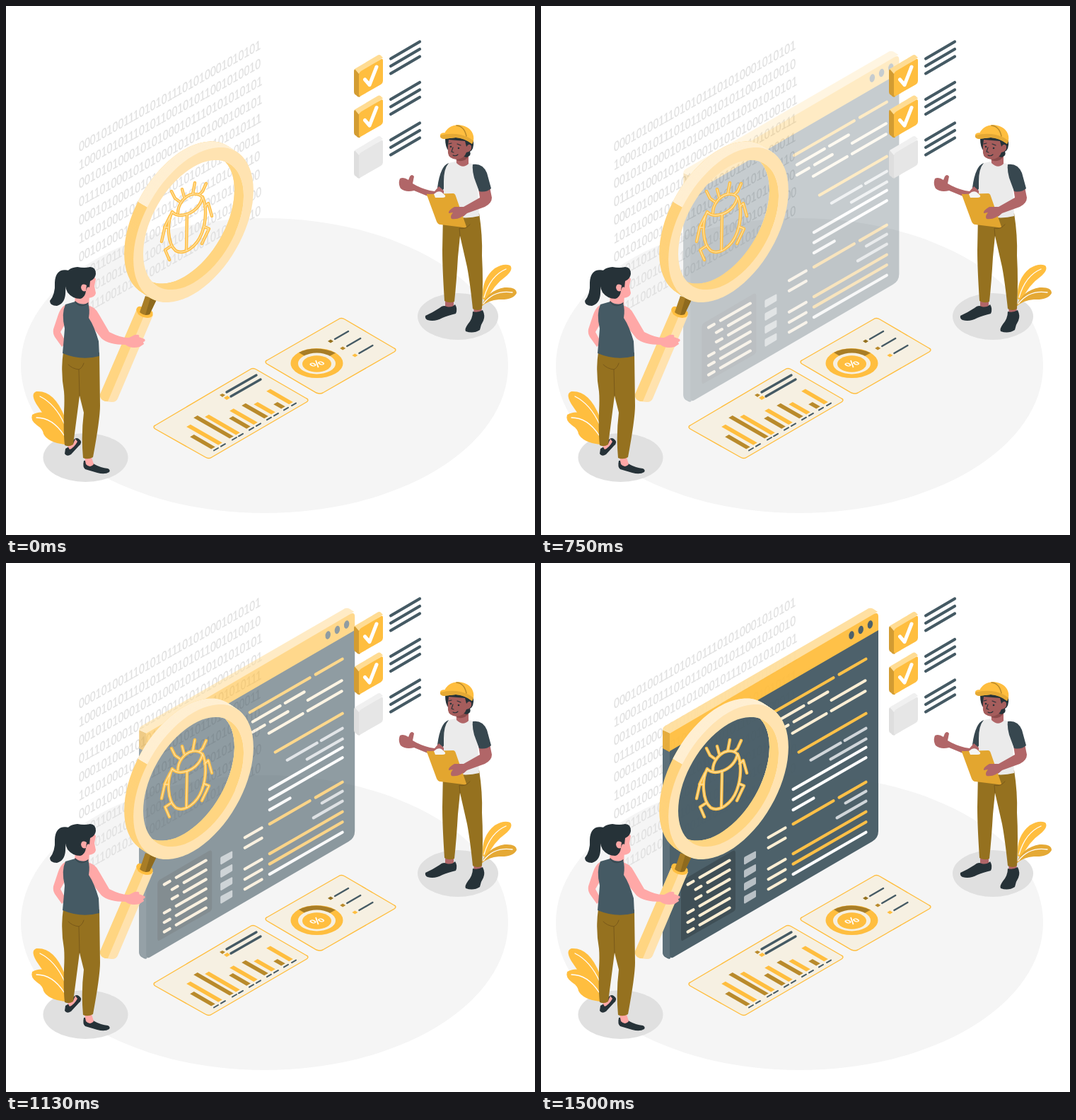
An HTML page for the animation above (1540 ms loop, 748 px wide and 748 px high).

```html
<!DOCTYPE html>
<html lang="en">
<head>
<meta charset="utf-8">
<title>Bug inspection</title>
<style>
html, body { margin: 0; width: 100%; height: 100%; overflow: hidden; background: #fff; }
svg { display: block; width: 100vw; height: 100vh; }
.y { fill: #ffbe3f } .d { fill: #263238 } .s { fill: #455a64 } .b { fill: #95711f }
.skin { fill: #ffa8a7 } .brown { fill: #b16668 }
.line { fill: none; stroke-linecap: round; stroke-linejoin: round }
#code text { font: 19px "Liberation Sans", Arial, sans-serif; fill: #e0e0e0; stroke: #e0e0e0; stroke-width: .3 }
</style>
</head>
<body>
<svg viewBox="0 0 748 748" xmlns="http://www.w3.org/2000/svg">
<defs>
  <clipPath id="hole"><circle r="82" transform="matrix(.866 -.5 0 1 265 309.5)"/></clipPath>
  <clipPath id="upper"><path d="M150 150H360V330L203 286L150 256Z"/></clipPath>
</defs>

<ellipse cx="365.5" cy="508.5" rx="344.5" ry="208.5" fill="#f5f5f5"/>
<ellipse cx="112.5" cy="638.5" rx="60" ry="34.5" fill="#e0e0e0"/>
<ellipse cx="639" cy="439" rx="57" ry="33" fill="#e0e0e0"/>
<g id="code"></g>

<g id="panel">
  <path class="s" d="M171 262L182 265V559Q180 561 176 558Q171 556 171 550Z"/>
  <path d="M171 262L182 268V559Q171 557 171 550Z" fill="#566a74"/>
  <path d="M171 236L182 241V268L171 262Z" fill="#e5a935"/>
  <path d="M171 236Q171 232 175 230L459 66Q464 62 469 65L475 69L182 241Z" fill="#ffdf9e"/>
  <path class="y" d="M181 241L468 73Q476 68 476 76V97L181 268Z"/>
  <path class="s" d="M181 266L476 95V379Q476 389 467 394L187 557Q181 561 181 553Z"/>
  <g id="dots" class="s"></g>
  <path d="M197 454Q197 450 200 448L270 407Q274 405 274 410V488Q274 491 271 493L201 533Q197 536 197 531Z" fill="#37474f"/>
  <g id="lines" class="line" stroke-width="4.1"></g>
  <g id="tiles" fill="#b5bec3"></g>
</g>

<g id="lens">
  <path d="M184 431L133 549Q132 556 140 559L150 560Q156 560 158 555L208 437Z" fill="#ffe2ae"/>
  <path d="M184 431L133 549Q132 556 140 559L144 559L196 436Z" fill="#ffd581"/>
  <path class="y" d="M184 430Q185 424 191 425L207 432Q209 437 205 440Q196 443 187 436Z"/>
  <path d="M197 410L213 415L203 436Q196 439 189 433Z" fill="#a87d26"/>
  <path d="M204 413L213 415L203 436L197 437Z" fill="#8e6a1e"/>
  <g id="rim" fill-rule="evenodd"></g>
</g>
<g id="bug"></g>

<!-- leaves -->
<path class="y" d="M83 604Q58 588 43 563Q34 548 43 545Q68 543 83 581Z"/>
<path class="y" d="M83 620Q59 617 53 605Q52 598 44 593Q34 586 37 578Q50 570 69 580Q80 588 84 600Z"/>
<path class="line" d="M48 552Q70 563 83 592M43 582Q66 582 82 607" stroke="#fff" stroke-width="1.3"/>

<!-- woman -->
<path class="skin" d="M87 422Q78 423 73 439L67 457Q66 463 69 468L79 482L85 476L77 461L86 445Z"/>
<path class="d" d="M84 626Q91 623 96 613Q100 609 104 613Q109 617 103 622L92 634Q86 638 83 633ZM110 643Q117 641 125 648Q134 653 144 654Q148 656 146 659Q140 663 129 660L112 655Q108 652 110 643Z"/>
<path class="skin" d="M85 619L95 619L98 612L101 616Q96 625 90 627ZM111 638L121 638L124 648Q119 654 113 648Z"/>
<path class="b" d="M81 489Q77 517 82 545Q83 556 82 574Q81 604 83 621Q89 624 95 620L104 551L110 575Q106 607 109 639Q116 642 123 638Q133 584 133 565L132 490Z"/>
<path class="line" d="M104 551L103 514Q94 513 88 507M103 514Q108 512 110 505" stroke="#79591a" stroke-width="1"/>
<path class="skin" d="M113 423Q126 424 132 437L146 461Q164 470 174 469L182 465Q190 464 188 468L196 471Q198 474 194 475L195 478L189 482Q176 485 169 479Q145 479 135 470L119 450Z"/>
<path class="skin" d="M98 402L118 408L117 425Q109 432 97 424Z"/>
<path class="s" d="M84 422Q91 420 98 418Q108 424 116 420Q119 429 117 441Q125 453 131 474L132 495Q106 502 80 491Q82 469 83 456Q78 435 84 422Z"/>
<path class="line" d="M98 418Q105 428 116 420" stroke="#37474f" stroke-width="1.5"/>
<path class="skin" d="M107 383Q122 377 127 386L125 396L127 406Q126 412 116 413L107 407Z"/>
<path class="d" d="M89 374Q70 370 69 391Q70 407 62 417Q62 424 72 424Q83 421 84 407Q84 388 89 381Z"/>
<path class="d" d="M84 382Q86 370 101 369Q111 371 119 369Q127 369 127 379Q126 386 119 389L118 398Q115 395 113 403Q112 412 105 414Q94 414 87 405Q82 396 84 382Z"/>
<path class="skin" d="M114 395Q107 391 106 398Q107 405 113 403Z"/>

<!-- cards -->
<g fill="#f6f0e2" stroke="#ffbe3f" stroke-width="1.4">
  <path d="M211 593L345 514Q349 511 354 514L425 555Q429 557 425 560L291 638Q287 641 282 638L211 598Q207 595 211 593Z"/>
  <path d="M369 501L470 443Q474 440 479 443L549 484Q553 486 549 489L448 547Q444 549 439 547L369 506Q365 503 369 501Z"/>
</g>
<g id="chart"></g>
<path class="line" d="M312 546L354 522M318 552L360 528" stroke="#455a64" stroke-width="3.4"/>
<path d="M302 550L306 548L310 550L306 553Z" fill="#b98a2b"/><path class="y" d="M308 554L313 551L317 554L312 557Z"/>
<ellipse class="y" cx="439.5" cy="505" rx="37" ry="21"/>
<path d="M439.5 505L414 490Q438 479 466 490.5Z" fill="#a87d26"/>
<ellipse cx="439.5" cy="505.5" rx="26.5" ry="15" fill="#f6f0e2"/>
<ellipse class="y" cx="439.5" cy="506" rx="20.5" ry="11.7"/>
<text transform="matrix(.7 -.4 .7 .4 445 509)" text-anchor="middle" font-family="Liberation Sans, sans-serif" font-weight="bold" font-size="22" fill="#fff">%</text>
<g id="legend"></g>

<g id="checks"></g>

<!-- right plant -->
<path class="y" d="M674 414Q672 386 691 371Q704 363 713 367Q718 373 706 383Q690 394 679 417Z"/>
<path d="M672 425Q681 402 705 398Q722 397 722 406Q717 416 697 415Q682 416 672 425Z" fill="#e5a935"/>
<path class="line" d="M707 372Q685 381 676 412M716 405Q690 401 675 421" stroke="#fff" stroke-width="1.3"/>

<!-- man -->
<path class="brown" d="M621 415L633 415L633 426L621 430ZM661 425L673 425L672 436L662 438Z"/>
<path class="d" d="M593 438Q604 433 613 427Q618 422 623 425Q630 427 635 422Q639 428 636 435Q624 438 617 441Q606 447 596 444Q592 442 593 438ZM660 432Q667 434 674 430Q678 438 675 445Q671 451 670 458Q661 464 650 460Q648 457 653 450Q660 442 660 432Z"/>
<path class="b" d="M618 294L669 293Q674 325 673 353Q675 390 673 428Q667 432 660 428Q656 390 652 369L642 325L639 355Q637 390 634 418Q627 421 620 417Q617 371 617 345Z"/>
<path class="line" d="M642 325L641 314Q649 317 656 309" stroke="#79591a" stroke-width="1"/>
<path d="M626 222Q614 226 610 257L617 262L625 247Z" fill="#37474f"/>
<path class="brown" d="M612 255L620 262L619 273Q604 272 594 268L577 261Q565 264 558 258Q554 251 557 244Q562 241 569 246L571 241Q574 237 577 241L575 251Q590 260 606 262Z"/>
<path d="M626 222Q643 217 661 224Q668 235 667 255L669 297Q646 303 619 294L619 248Q619 230 626 222Z" fill="#ebebeb"/>
<path class="brown" d="M636 207L654 207L654 223Q646 231 637 222Z"/>
<path d="M637 214Q647 216 654 207V213Q647 222 637 218Z" fill="#8c4b4b"/>
<path class="brown" d="M668 258L684 256L687 271Q687 279 677 284L652 293Q641 304 630 301Q624 294 629 287L647 284L670 271Z"/>
<path d="M660 224Q674 222 680 236L686 258Q679 264 669 262L662 243Q659 232 660 224Z" fill="#37474f"/>
<path d="M595 267Q594 265 598 266L632 265Q635 265 636 269L651 312Q651 314 646 313L614 309Q611 309 609 305Z" fill="#e3a62f"/>
<path d="M605 266L609 263Q614 261 617 264L621 268Q622 271 617 271L607 271Z" fill="#f5f5f5"/>
<path class="brown" d="M650 284L634 284Q625 289 626 293L632 292Q627 298 630 301Q642 303 653 291Z"/>
<path class="d" d="M621 187Q621 200 626 205L651 214Q659 211 656 206Q662 203 661 190L650 181Z"/>
<path d="M626 189L649 191L651 199Q655 193 658 198Q659 206 651 207Q648 216 637 217Q626 216 625 208Q624 199 626 189Z" fill="#a55d5c"/>
<path class="line" d="M626 195L630 194M638 195L643 197M632 200L630 206L633 207M632 211Q636 213 639 210" stroke="#263238" stroke-width="1.1"/>
<circle class="d" cx="629" cy="199" r="1.3"/><circle class="d" cx="640" cy="201" r="1.3"/>
<path class="y" d="M619 183Q623 169 640 168Q658 170 661 184Q662 190 659 195Q648 186 636 186L619 188Q613 187 614 182Q615 179 621 179Z"/>
<path d="M614 183Q629 179 643 182Q655 185 661 191L659 195Q648 187 636 186L619 188Q613 187 614 183Z" fill="#e5a935"/>
<path class="line" d="M637 169Q648 170 651 184" stroke="#b98a2b" stroke-width="1.5"/>
</svg>

<script>
const $ = id => document.getElementById(id);
const put = (id, html) => $(id).insertAdjacentHTML('beforeend', html);
const SLOPE = 0.577;
const YEL = '#ffbe3f', CREAM = '#ffefd3', WHITE = '#fff', GREY = '#cfd5d9', OCHRE = '#b98a2b', SLATE = '#455a64';

// binary wall
[
  '000101001110101011101010001010101',
  '100010101110101100101011001010010',
  '001010100010101000101110101010101',
  '011101000101010001010101000100101',
  '000101000101010001010110101010111',
  '101010001010110110101011010100011',
  '001010001011011010110101101010110',
  '010110110101100101011010010101100',
  '110010010101100101011001010101000',
  '101110010101100101011001010101010'
].forEach((row, i) =>
  put('code', `<text transform="matrix(.75 -.426 0 1 103 ${206.5 + 26 * i})">${row}</text>`));

// window buttons
for (let i = 0; i < 3; i++)
  put('dots', `<ellipse rx="3.6" ry="5.8" transform="translate(${438 + 13.2 * i} ${102 - 7.5 * i}) rotate(12)"/>`);

// text on the window: colour, height at the right margin, start and end pairs
const rule = (color, y, ...xs) => {
  for (let i = 0; i < xs.length; i += 2) {
    const [a, b] = [xs[i] + 1.5, xs[i + 1] - 1.5];
    const at = x => y + (458 - x) * SLOPE;
    put('lines', `<path d="M${a} ${at(a)}L${b} ${at(b)}" stroke="${color}"/>`);
  }
};
rule(YEL, 136, 326, 414, 419, 460);
rule(CREAM, 151.5, 330, 372, 376, 406);
rule(CREAM, 166, 330, 350, 355, 383, 408, 459);
rule(CREAM, 181, 353, 404, 408, 459);
rule(YEL, 213, 362, 460);
rule(GREY, 234, 379, 424, 427, 460);
rule(GREY, 249, 407, 460);
[261, 275.5].forEach(y => rule(WHITE, y, 354, 460));
rule(WHITE, 290, 354, 386);
rule(YEL, 310, 354, 414, 419, 460);
rule(GREY, 323, 428, 460);
rule(GREY, 337, 416, 460);
rule(YEL, 352, 354, 460);
rule(YEL, 366.5, 354, 460);
rule(WHITE, 381, 354, 460);
[374, 388.5, 418.5, 433, 447].forEach(y => rule(CREAM, y - 65, 319, 346));
for (let i = 0; i < 6; i++) {
  const y = 309.5 + 13.4 * i, indent = i == 1 || i == 2 ? 11 : 0;
  rule(CREAM, y, 205 + indent, 216 + indent, 222 + indent, 267);
}
for (let i = 0; i < 4; i++) {
  const y = 416.5 + 18.4 * i;
  put('tiles', `<path d="M286 ${y + 1}Q286 ${y} 287 ${y - 1}L302 ${y - 9}Q303 ${y - 9} 303 ${y - 8}V${y}L302 ${y + 1}L287 ${y + 10}L286 ${y + 9}Z"/>`);
}

// magnifier rim: a thick ring on an isometric wall
function circle(r, [x, y]) {
  let d = '';
  for (let i = 0; i < 72; i++) {
    const a = i * Math.PI / 36, u = r * Math.cos(a), v = r * Math.sin(a);
    d += (i ? 'L' : 'M') + (x + 0.866 * u).toFixed(1) + ' ' + (y + v - 0.5 * u).toFixed(1);
  }
  return d + 'Z';
}
const R = 98, HOLE = 82, DEPTH = 13, back = [252, 301], front = [265, 309.5];
const ring = at => `<path d="${circle(R, at)}${circle(HOLE, at)}"/>`;
const wall = Array.from({ length: DEPTH }, (_, i) =>
  ring([back[0] + i, back[1] + i * 8.5 / DEPTH])).join('');
put('rim',
  `<g fill="#ffd27a">${wall}</g>` +
  `<g fill="#ffefd2" clip-path="url(#upper)">${wall}</g>` +
  `<path fill="#ffd581" clip-path="url(#hole)" d="M150 150H380V440H150Z${circle(HOLE, back)}"/>` +
  `<g fill="#ffe3b1">${ring(front)}</g>`);

// bug
const bug = 'M235 291C227 307 228 336 240 346C252 353 270 340 277 321C283 305 284 283 278 270' +
  'M235 291Q242 299 257 294Q274 287 278 270M243 293C243 280 253 268 264 266Q274 265 278 271M256 294L255 346' +
  'M234 262L239 272L246 277M249 259L252 270M267 250L264 266M283 251L278 262L273 267' +
  'M232 297L225 311L220 333M230 313L224 313M281 284L286 279L291 297M280 312L287 315L277 336' +
  'M234 339L225 345L231 359';
put('bug', [['#ffbf47', 4.4], ['#ffe09f', 1.4]].map(([c, w]) =>
  `<path class="line" d="${bug}" stroke="${c}" stroke-width="${w}"/>`).join(''));

// bar chart: end of each bar on the axis and its length
[[293, 30], [303, 45], [319, 51], [328, 44], [343, 25], [353, 34], [368, 32], [378, 25], [392, 11], [403, 32]]
  .forEach(([x, len], i) => {
    const y = 625 - SLOPE * (x - 293), w = 2.8;
    put('chart', `<path fill="${i % 2 ? YEL : OCHRE}" d="M${x - len - w} ${y - (len - w) * SLOPE}l${2 * w} ${-2 * w * SLOPE}l${len} ${len * SLOPE}l${-2 * w} ${2 * w * SLOPE}Z"/>` +
      `<path d="M${x + 1} ${y + 3.5}l6 -3.5" stroke="${SLATE}" stroke-width="2" stroke-linecap="round"/>`);
  });

['#95711f', OCHRE, YEL].forEach((c, i) => {
  const x = 459 + 17.2 * i, y = 474 + 10 * i;
  put('legend', `<path d="M${x - 4} ${y}l4 -2.5l4 2.5l-4 2.5Z" fill="${c}"/>` +
    `<path class="line" d="M${x + 6} ${y - 3}l19 -11" stroke="${SLATE}" stroke-width="2.4"/>`);
});

// checklist
for (let i = 0; i < 3; i++) {
  const [top, side, face] = i < 2 ? ['#ffdc93', '#d39c32', YEL] : ['#f0f0f0', '#dedede', '#e6e6e6'];
  put('checks', `<g transform="translate(0 ${57.5 * i})">
    <path fill="${side}" d="M492 92Q492 89 495 89L501 95V128Q498 130 495 126Q492 125 492 121Z"/>
    <path fill="${top}" d="M493 89L525 70Q528 68 530 70L533 73L499 96Z"/>
    <path fill="${face}" d="M499 97Q499 94 502 92L529 76Q533 73 533 77V106Q533 109 530 111L502 127Q499 129 499 125Z"/>
    ${i < 2 ? '<path class="line" d="M507.5 104L514 111.5L524 86" stroke="#fff" stroke-width="5"/>' : ''}
    <path class="line" d="M544 74.5L585 50.5M544 85L585 61M544 95.5L585 71.5" stroke="${SLATE}" stroke-width="4.2"/></g>`);
}

// cubic-bezier(.42, 0, 1, 1)
function easeIn(x) {
  let lo = 0, hi = 1;
  for (let i = 0; i < 30; i++) {
    const s = (lo + hi) / 2, q = 1 - s;
    if (1.26 * q * q * s + 3 * q * s * s + s * s * s < x) lo = s; else hi = s;
  }
  return 3 * lo * lo - 2 * lo * lo * lo;
}

const LOOP = 1540, STEPS = 37, SLIDE = 44.88, REST = 1;
function draw(ms) {
  const step = Math.floor((ms % LOOP) / LOOP * STEPS + 0.05);
  const p = easeIn(step % STEPS / STEPS);
  $('panel').setAttribute('opacity', p.toFixed(4));
  $('panel').setAttribute('transform', `translate(${(SLIDE * (1 - p) - REST).toFixed(3)} 0)`);
}

let start;
function tick(now) {
  start ??= now;
  draw(now - start);
  requestAnimationFrame(tick);
}
draw(0);
requestAnimationFrame(tick);
</script>
</body>
</html>
```
